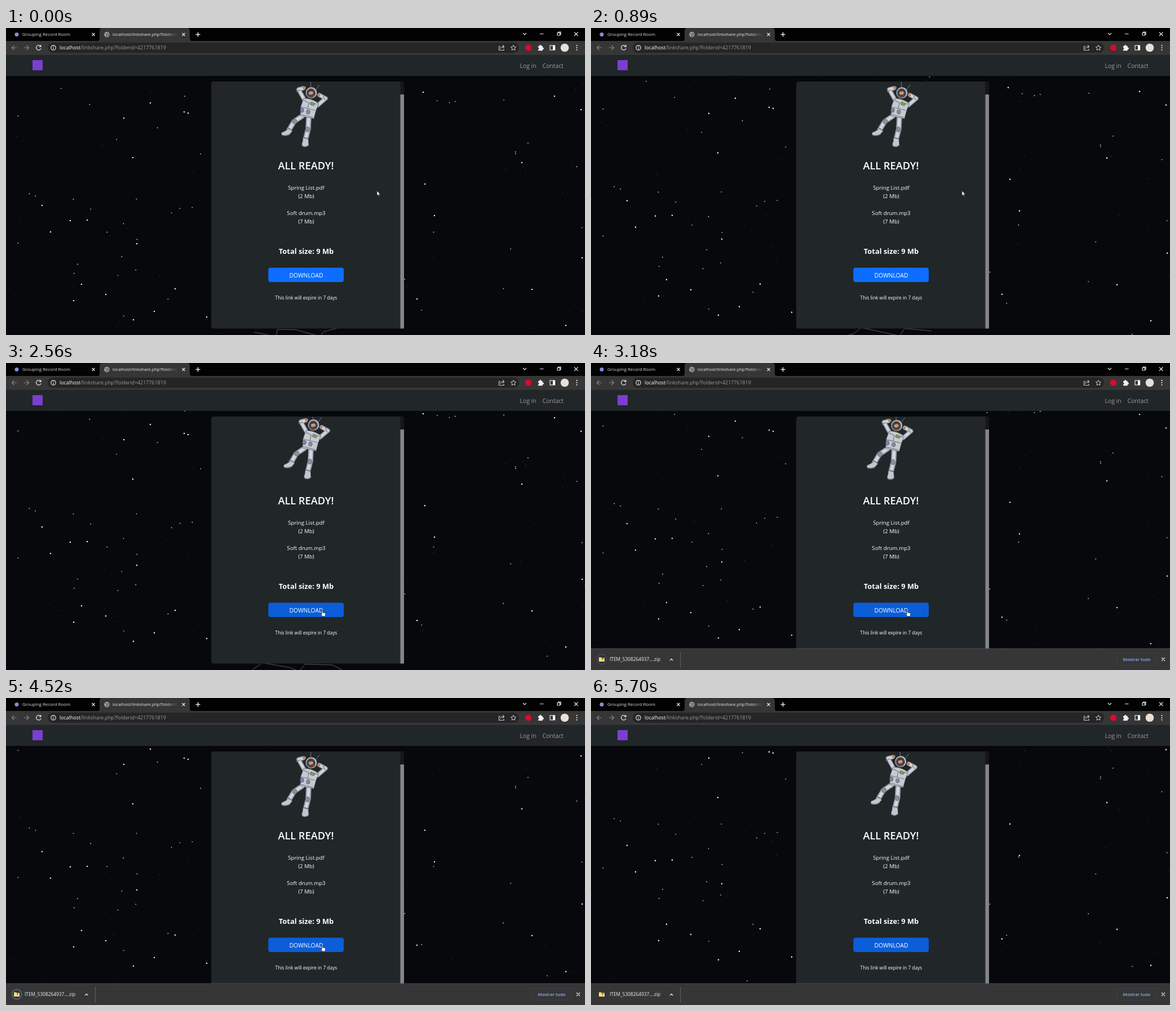
Write an HTML page that moves like this. It is 1027 px wide and 545 px high and loops after 5780 ms.

```html
<!DOCTYPE html>
<html lang="en">
<head>
<meta charset="utf-8">
<title>Link share</title>
<style>
  html, body { margin: 0; width: 100%; height: 100%; overflow: hidden; background: #07080b; }
  svg { display: block; width: 100vw; height: 100vh; font-family: "Open Sans", "Noto Sans", sans-serif; }
  .line { fill: none; stroke: #e6e6e6; stroke-width: 1.2; }
  .mid { text-anchor: middle; fill: #fff; }
</style>
</head>
<body>
<svg viewBox="0 0 1027 545" preserveAspectRatio="none">
  <defs>
    <linearGradient id="fade" gradientUnits="userSpaceOnUse" x1="284" x2="305" y1="0" y2="0">
      <stop offset="0" stop-color="#e8e8e8"/><stop offset="1" stop-color="#e8e8e8" stop-opacity="0"/>
    </linearGradient>
    <clipPath id="cardClip"><rect x="364" y="95.5" width="335" height="438"/></clipPath>
  </defs>

  <rect y="85" width="1027" height="460" fill="#07080b"/>
  <g id="small" fill="#fff"></g>
  <g id="medium" fill="#fff"></g>
  <g id="large" fill="#fff"></g>
  <path id="mesh" fill="none" stroke="#7d7f84" stroke-width=".7"/>

  <!-- card -->
  <rect x="364" y="95" width="342" height="438.5" rx="4.5" fill="#212628"/>
  <path d="M699.5 95.5h3a4 4 0 0 1 3.5 4v19h-6.5z" fill="#151718"/>
  <rect x="699.5" y="118" width="6.5" height="415.5" fill="#858585"/>
  <g clip-path="url(#cardClip)"><g id="astro"></g></g>
  <text class="mid" x="532" y="251" font-size="18.2" font-weight="600">ALL READY!</text>
  <g class="mid" font-size="9.7">
    <text x="532.5" y="287">Spring List.pdf</text>
    <text x="532.5" y="302">(2 Mb)</text>
    <text x="532.5" y="332">Soft drum.mp3</text>
    <text x="532.5" y="347">(7 Mb)</text>
  </g>
  <text class="mid" x="532.5" y="401" font-size="12.9" font-weight="700">Total size: 9 Mb</text>
  <rect id="button" x="465.3" y="425.6" width="133.8" height="25.4" rx="4"/>
  <text class="mid" x="532.5" y="443" font-size="10.4">DOWNLOAD</text>
  <text class="mid" x="532.5" y="481.5" font-size="8.4">This link will expire in 7 days</text>

  <!-- site header -->
  <rect y="47" width="1027" height="38" fill="#212628"/>
  <rect x="47" y="57" width="18" height="18" fill="#7a3fd0"/>
  <g font-size="10.4" fill="#9b9d9e"><text x="911.5" y="70.5">Log in</text><text x="951.5" y="70.5">Contact</text></g>

  <!-- browser -->
  <rect width="1027" height="24" fill="#020202"/>
  <rect y="23" width="1027" height="24" fill="#363636"/>
  <path d="M161 23.5q5 0 5-5V5q0-5 5-5h150q5 0 5 5v13.5q0 5 5 5z" fill="#363636"/>
  <rect x="74" y="26" width="836" height="18" rx="9" fill="#252525"/>
  <path d="M0 47h1027" stroke="#464646" stroke-width=".7"/>
  <circle cx="19" cy="11.5" r="3.5" fill="#7f8fe0"/>
  <text x="29" y="14" font-size="7.8" fill="#dedede">Grouping Record Room</text>
  <text x="189" y="14" font-size="7.7" fill="url(#fade)">localhost/linkshare.php?folderid</text>
  <text x="95" y="38.2" font-size="8.9" fill="#9b9b9b"><tspan fill="#fff">localhost</tspan>/linkshare.php?folderid=4217761819</text>
  <circle cx="179" cy="11.5" r="4.8" fill="#a5a7aa"/>
  <path d="M175.5 9.5l2.500 1 1 2-1.500 2.500M180 8l1 2.500 2.500.5M179.500 15l1.500-2h2" class="line" style="stroke:#454545"/>
  <g class="line">
    <path d="M152.500 9l5 5m0-5l-5 5M312.500 9l5 5m0-5l-5 5"/>
    <path d="M336.500 11.500h8m-4-4v8" style="stroke-width:1.5"/>
    <path d="M917 9l3 3 3-3M947 10.500h6.500M978 8.500h4.500v4.500H978zM979.500 8.500v-1.300h4.500v4.500h-1.400M1008 7.500l6.500 6.500m0-6.500l-6.500 6.500"/>
    <path d="M19 35h-8.500m4-4l-4 4 4 4M32 35h8.500m-4-4l4 4-4 4" style="stroke:#858585"/>
    <path d="M61.300 32.200a4.300 4.300 0 1 0 .7 4M62 30v3.200h-3.200"/>
    <circle cx="84" cy="35" r="4.2"/><path d="M84 34.500v2.700M84 32.300v1"/>
    <path d="M877 32.500h-2.500v7h8.500v-2.500M877 37q.5-4 6-4m-2-2.500l2.500 2.500-2.500 2.500" style="stroke:#c4c4c4"/>
    <path d="M900 30.500l1.400 3 3.200.4-2.400 2.200.7 3.200-2.900-1.600-2.900 1.600.7-3.200-2.400-2.200 3.200-.4z" style="stroke:#d2d2d2;stroke-width:1"/>
    <rect x="965" y="31" width="8.500" height="8"/>
  </g>
  <rect x="970" y="31" width="4" height="8" fill="#fff"/>
  <circle cx="926.500" cy="35" r="5.600" fill="#e0082d"/>
  <path d="M944 32h2.300a1.700 1.700 0 1 1 3.300 0h2.200v2.600a1.700 1.700 0 1 1 0 3.300v2.300H944v-2.500a1.500 1.500 0 1 0 0-3z" fill="#f2f2f2"/>
  <circle cx="991" cy="35" r="7.300" fill="#e9dfd6"/>
  <path d="M1012.500 31.200v.01m0 3.800v.01m0 3.800v.01" stroke="#eee" stroke-width="2.200" stroke-linecap="round"/>

  <!-- download shelf -->
  <g id="shelf">
    <rect y="507" width="1027" height="38" fill="#363636"/>
    <path d="M0 507h1027" stroke="#4a4a4a"/>
    <circle id="disc" cx="19" cy="526" r="8.500" fill="#2b2d30"/>
    <circle id="ring" cx="19" cy="526" r="8.500" fill="#303a48" stroke="#8ab4f8" stroke-width="1.400"/>
    <path d="M14 522.300h3.800l1.200 1.300h5v6.400H14z" fill="#f2c94c"/>
    <path d="M14 525h10v5H14z" fill="#ffe08a"/><path d="M19.500 523.600h2v4h-2z" fill="#8b7630"/>
    <text x="33" y="529.300" font-size="8.300" fill="#f0f0f0">ITEM_5308264937....zip</text>
    <path class="line" d="M140 528l2.700-2.700 2.700 2.700M1012 523l6 6m0-6l-6 6"/>
    <path d="M158.500 512.500v28.500" stroke="#606060"/>
    <rect x="933" y="515.500" width="70" height="21" rx="2" fill="none" stroke="#404246" stroke-width=".8"/>
    <text x="968" y="528.800" font-size="7.700" font-weight="600" text-anchor="middle" fill="#8ab4f8">Mostrar tudo</text>
  </g>

  <!-- pointers: tip at 0,0 -->
  <path id="arrow" d="M0 0v8.500l2-1.800 1.400 3 1.300-.6-1.400-2.900h2.500z" fill="#fff" stroke="#111" stroke-width=".6"/>
  <path id="hand" d="M-.8.6Q0-.6.8.6V4l4 .8q1 .4.9 1.600L5 10.800H.5L-2.800 7q-.2-1.500 2 .2z" fill="#fff" stroke="#111" stroke-width=".6"/>
</svg>
<script>
const LOOP = 5780, BLINK = 840;
const SHELF_AT = 2900, SHELF_END = 3100, DONE_AT = 5570;
const $ = id => document.getElementById(id);
const show = (id, on) => { $(id).style.display = on ? '' : 'none'; };
const move = (id, x, y) => $(id).setAttribute('transform', `translate(${x.toFixed(2)} ${y.toFixed(2)})`);

// Linear path through key points [time, x, y].
function along(keys, t) {
  const i = Math.max(1, keys.findIndex(k => k[0] > t));
  const [t0, x0, y0] = keys[i - 1], [t1, x1, y1] = keys[i];
  const k = (t - t0) / (t1 - t0);
  return [x0 + (x1 - x0) * k, y0 + (y1 - y0) * k];
}

// Three star layers: the larger, the slower. Speed in px per second.
let seed = 41;
const rnd = () => (seed = (seed * 16807) % 2147483647) / 2147483647;
const layers = [
  { id: 'small', count: 200, size: 0.9, speed: 28, light: () => 0.2 + rnd() * 0.25 },
  { id: 'medium', count: 58, size: 1.6, speed: 14, light: () => 0.85 },
  { id: 'large', count: 0, size: 2.2, speed: 9.35, light: () => 1 }
];
const bright = [[256, 133], [316, 149], [323, 151], [209, 160], [225, 230], [64, 315], [114, 342], [144, 341],
  [79, 362], [232, 383], [134, 455], [177, 473], [120, 484], [263, 503], [300, 463], [226, 518], [356, 513],
  [740, 114], [973, 121], [1020, 145], [915, 239], [743, 277], [760, 333], [1022, 408], [933, 464], [729, 481],
  [993, 528]];
for (const { id, count, size, speed, light } of layers) {
  const depth = 460 + speed * LOOP / 1000;
  const spots = count ? Array.from({ length: count }, () => [rnd() * 1027, 85 + rnd() * depth]) : bright;
  $(id).innerHTML = spots.map(([x, y]) => `<rect x="${x - size / 2}" y="${y - size / 2}" width="${size}"
    height="${size}" rx="${size / 4}" opacity="${light()}"/>`).join('');
}

// Astronaut: each limb is an outline, a grey body and a lit core.
const limb = (d, w) => [['#4d515c', w + 1.2], ['#a3a7b3', w], ['#d5d7de', w * 0.55]].map(([c, n]) =>
  `<path d="${d}" fill="none" stroke="${c}" stroke-width="${n}" stroke-linecap="round" stroke-linejoin="round"/>`).join('');
const dot = (x, y, rx, ry, c, edge = 'none') =>
  `<ellipse cx="${x}" cy="${y}" rx="${rx}" ry="${ry}" fill="${c}" stroke="${edge}" stroke-width=".8"/>`;
const shape = (d, c) => `<path d="${d}" fill="${c}" stroke="#4d515c" stroke-width=".7"/>`;
const stroke = (d, c, w) => `<path d="${d}" fill="none" stroke="${c}" stroke-width="${w}"/>`;
$('astro').innerHTML = [
  stroke('M540.500 95v11M556 101l-6 8', '#777b86', 1),
  limb('M529 127l-10-18 8-2', 7), limb('M553 137l14-12-11-6', 7),
  stroke('M515 113l7-3M562 120l4 8', '#777b86', 1.4),
  dot(529, 106, 3, 2.5, '#b98463'), dot(555, 119, 2.5, 2.5, '#b98463'),
  limb('M526 156l-15 10-9 15', 8.5), limb('M537 158l-1 21-4 16', 9),
  shape('M503 178l5 5-6 7q-8 3-13 0-2-5 4-6z', '#c3c6cf'),
  shape('M527 194l9 2 1 12q-5 5-12 1-1-4 1-7z', '#c3c6cf'),
  stroke('M490 190q6 2 12-1M525 209q6 4 12-1M500 177l7 5M527 195l9 2', '#6c707d', 1.2),
  dot(512, 166, 4, 4.2, '#8c909d', '#5c606c'), dot(535, 180, 3.6, 4.6, '#8c909d', '#5c606c'),
  shape('M528 125q13-1 27 9l-5 12-4 15-24-5 1-17z', '#c6c9d1'),
  stroke('M528 128l11 6 14 1M523 140l25 6M522 153l23 6M537 134l-2 9', '#737785', 1.2),
  dot(525, 146, 3.2, 3.8, '#7189ac', '#4d5261'), dot(536, 149, 3.2, 3.8, '#8d8e99', '#4d5261'),
  shape('M541 131l7 3-2 4-6-2z', '#6fae3f'),
  dot(541.5, 115, 10, 10, '#c9ccd5', '#4d515c'), dot(541, 115.5, 8, 8.2, '#344150', '#737d8c'),
  dot(541, 116, 4, 5.5, '#cf9673'),
  shape('M536 115q0-7 5-7 6 0 5 7l-3-3-5 1z', '#5c331f'),
  shape('M537 118q4 2 8-1 0 6-4 6t-4-5z', '#6c3c24')
].join('');

const hover = [[0, 0, 0], [890, 10, 0], [1530, 5, -5], [2560, 4, -5], [3890, -3, -3], [4527, 0, 0]];
const pointer = [[0, 658, 289], [1200, 658, 289], [1530, 585, 400], [1900, 561, 439], [LOOP, 561, 439]];

// Slowly swaying wire net that peeks out under the card.
const meshPath = s => 'M' + Array.from({ length: 7 }, (_, i) =>
  `${440 + 26 * i + 14 * Math.sin(s * 1.3 + i * 2)} ${540 + 8 * Math.sin(s + i * 1.9)}`).join('L');

function draw(t) {
  const s = t / 1000;
  for (const { id, speed } of layers) move(id, 0, -speed * s);
  move('astro', ...along(hover, t % 4527));
  $('mesh').setAttribute('d', meshPath(s));

  const [x, y] = along(pointer, t);
  const over = y >= 426, visible = t < 5650;
  move('arrow', x, y);
  move('hand', x, y);
  show('arrow', visible && !over);
  show('hand', visible && over);
  $('button').setAttribute('fill', over ? '#0b5ed7' : '#0d6efd');

  const rise = Math.min(1, (t - SHELF_AT) / (SHELF_END - SHELF_AT));
  show('shelf', rise > 0);
  move('shelf', 0, 38 * (1 - rise));
  const busy = t < DONE_AT;
  const glow = 0.5 - 0.5 * Math.cos((t - 3050) / BLINK * 2 * Math.PI);
  $('ring').setAttribute('opacity', busy ? glow.toFixed(3) : 0);
  show('disc', busy);
}

const start = performance.now();
function frame() {
  draw((performance.now() - start) % LOOP);
  requestAnimationFrame(frame);
}
frame();
</script>
</body>
</html>
```
